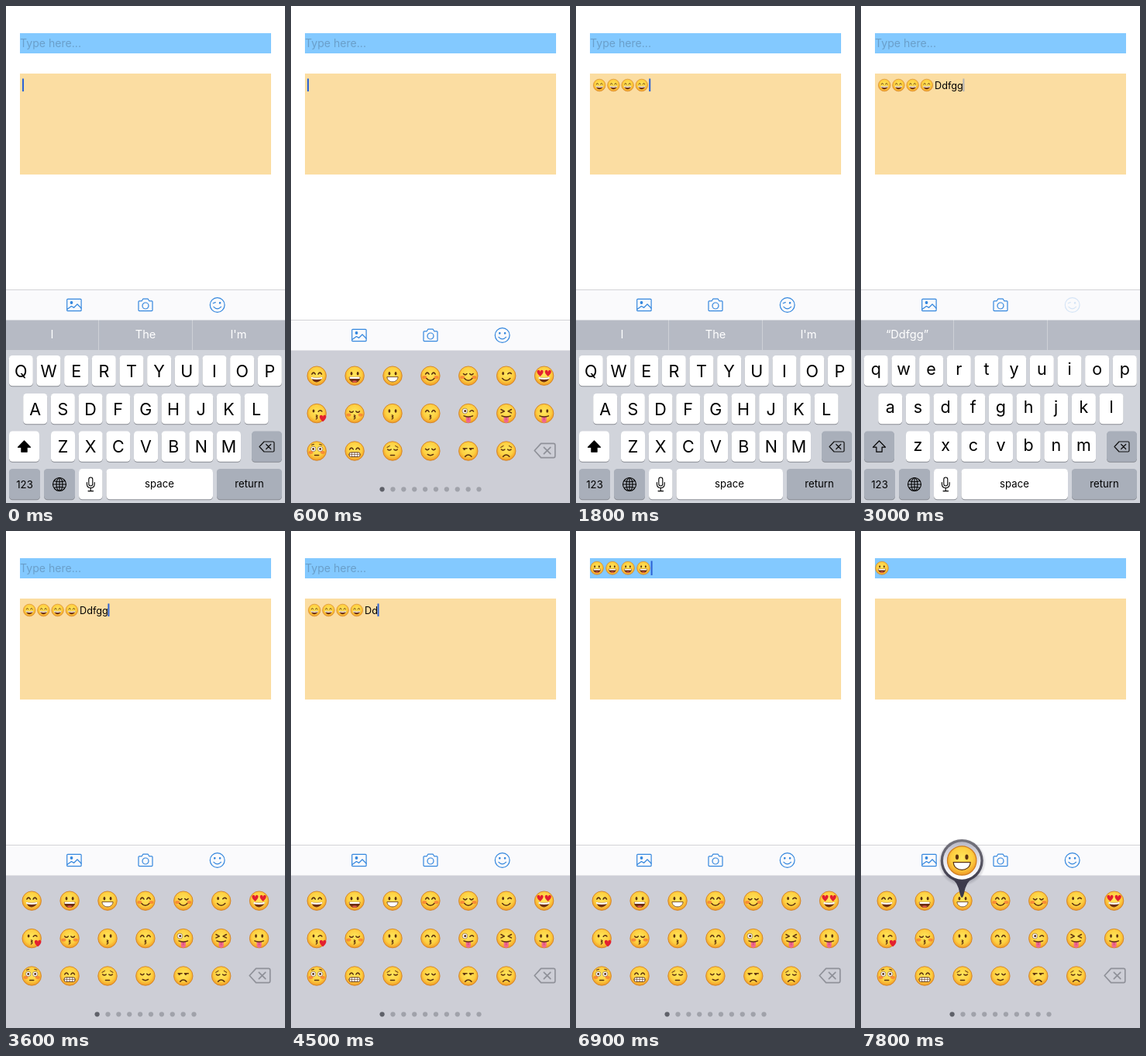
An HTML page that plays this animation: 360x640 px, repeating every 8 s.

```html
<!DOCTYPE html>
<html lang="en">
<head>
<meta charset="utf-8">
<title>Emoji keyboard</title>
<style>
  html, body { margin: 0; width: 100%; height: 100%; overflow: hidden; background: #fff; }
  svg { display: block; width: 100vw; height: 100vh; }
  text { font-family: Inter, Roboto, sans-serif; }
  .mid { text-anchor: middle; }
  .cap { font-size: 21.5px; }
  .low { font-size: 21.5px; }
  .word { font-size: 13.2px; }
  .hint { font-size: 14.6px; fill: #fff; }
  .icon { fill: none; stroke: #3487de; stroke-width: 1.2; stroke-linejoin: round; stroke-linecap: round; }
</style>
</head>
<body>
<svg id="stage" viewBox="0 0 360 640" xmlns="http://www.w3.org/2000/svg"></svg>
<script>
const LOOP = 8000, STEP = 300;
const BROWN = "#5d3210";

// keyboard (A caps, a lower, e emoji), smileys, word, field smileys, icon alpha, popup key, caret alpha
const steps = [
  ["A", 0, ""],
  ["A", 0, "", null, 0.2],
  ["e", 0, ""],
  ["e", 1, "", null, 1, 0],
  ["e", 3, ""],
  ["e", 4, "", null, 0.2],
  ["A", 4, ""],
  ["a", 4, "D"],
  ["a", 4, "Dd"],
  ["a", 4, "Ddfg"],
  ["a", 4, "Ddfgg", null, 0.18, -1, 0.35],
  ["e", 4, "Ddfgg"],
  ["e", 4, "Ddfgg"],
  ["e", 4, "Ddfg"],
  ["e", 4, "Ddf"],
  ["e", 4, "Dd"],
  ["e", 4, ""],
  ["e", 3, ""],
  ["e", 1, ""],
  ["e", 0, ""],
  ["e", 0, "", 0],
  ["e", 0, "", 1, 1, 1],
  ["e", 0, "", 3],
  ["e", 0, "", 4],
  ["e", 0, "", 3],
  ["e", 0, "", 2],
  ["e", 0, "", 1, 1, 2, 0]
];

const line = (d, w = 1.5, c = BROWN) =>
  `<path d="${d}" fill="none" stroke="${c}" stroke-width="${w}" stroke-linecap="round" stroke-linejoin="round"/>`;
const shape = (d, c, more = "") => `<path d="${d}" fill="${c}" ${more}/>`;
const oval = (x, y, rx, ry, c, more = "") =>
  `<ellipse cx="${x}" cy="${y}" rx="${rx}" ry="${ry}" fill="${c}" ${more}/>`;
const rect = (x, y, w, h, c, r = 0, more = "") =>
  `<rect x="${x}" y="${y}" width="${w}" height="${h}" rx="${r}" fill="${c}" ${more}/>`;
const label = (x, y, s, cls, more = "") => `<text x="${x}" y="${y}" class="${cls}" ${more}>${s}</text>`;
const heart = (x, y, s, c = "#e3202f") =>
  `<path transform="translate(${x} ${y}) scale(${s})" fill="${c}" d="M0 4C-6-1-4-4-2-4Q-.4-4 0-2Q.4-4 2-4C4-4 6-1 0 4Z"/>`;
const pair = f => f(-4) + f(4);

const eyes = {
  dot: pair(x => oval(x, -3, 1.35, 2.2, BROWN)),
  arc: pair(x => line(`M${x - 2.2}-2q2.2-4 4.4 0`)),
  shut: pair(x => line(`M${x - 2.2}-2.6q2.2 2.6 4.4 0`)),
  wink: oval(-4, -3, 1.35, 2, BROWN) + line("M2-2.4q2.3-2.6 4.6-.2"),
  heart: pair(x => heart(x * 1.25, -3.2, 1)),
  mad: oval(-4.3, -3, 3.3, 3.3, "#fff", `stroke="${BROWN}" stroke-width=".5"`) + oval(-4, -3, 1.5, 1.5, BROWN)
    + line("M2-2.4q2.3-2.6 4.6-.2"),
  tight: line("M-6.6-5l4.3 2.3-4.3 2M6.6-5l-4.3 2.3 4.3 2"),
  wide: pair(x => oval(x * 1.1, -2.5, 3.2, 3.2, "#fff", `stroke="${BROWN}" stroke-width=".5"`)
    + oval(x * 1.1, -2.5, 1.4, 1.4, BROWN)) + line("M-6.5-7.5l3-1M6.5-7.5l-3-1", 1),
  side: pair(x => line(`M${x - 2.5}-3.2h4.8`) + oval(x - 1, -2.3, 1.3, 1.3, BROWN)),
  sad: pair(x => line(`M${x - 2.2}-2q2.2 2 4.4 0`)) + line("M-6.8-4.5l3.2-2M6.8-4.5l-3.2-2", 1)
};

const tongue = shape("M-3 4.2H3V8.5a3 3.4 0 0 1-6 0Z", "#f0688f") + line("M0 5v3", 0.7, "#c83c68");
const mouths = {
  open: shape("M-7.2 1.6Q0 3.4 7.2 1.6C7 7-3.6 13-7.2 1.6Z", "#6e2f10")
    + shape("M-7.2 1.6Q0 3.4 7.2 1.6L6.7 4Q0 5.2-6.7 4Z", "#fff"),
  laugh: shape("M-7.2 1.4H7.2C7 11-7 11-7.2 1.4Z", "#6e2f10") + rect(-6.4, 1.6, 12.8, 2.2, "#fff", 0.6)
    + oval(0, 7.3, 3, 1.1, "#e85a50"),
  teeth: shape("M-7 1.4H7C6.6 9.6-6.6 9.6-7 1.4Z", "#fff", `stroke="${BROWN}" stroke-width=".8"`),
  smile: line("M-5 3.2Q0 8.8 5 3.2"),
  soft: line("M-3.6 4.4Q0 7 3.6 4.4"),
  kiss: line("M-.8 2.2q3.2.4 0 2.3q3.2.8 0 2.6", 1.3),
  tongue: tongue + line("M-5.6 3.2Q0 5.4 5.6 3.2"),
  grin: rect(-7, 1.8, 14, 5.5, "#fff", 2.5, `stroke="${BROWN}" stroke-width=".9"`)
    + line("M-7 4.5H7M-3.5 2v5M0 2v5M3.5 2v5", 0.6),
  flat: line("M-2.5 5.3h5"),
  frown: line("M-4 7Q0 3 4 7")
};
const blush = pair(x => oval(x * 1.85, 1.8, 2.8, 2, "#f2552d", 'opacity=".55"'));

const faces = [
  ["arc", "open"], ["dot", "laugh"], ["dot", "teeth"], ["arc", "smile", blush], ["shut", "smile", blush],
  ["wink", "smile"], ["heart", "open"],
  ["wink", "kiss", heart(7.8, 6.2, 1.05)], ["shut", "kiss", blush], ["dot", "kiss"], ["arc", "kiss"],
  ["mad", "tongue"], ["tight", "tongue"], ["dot", "tongue"],
  ["wide", "flat", blush], ["arc", "grin"], ["sad", "flat"], ["shut", "soft"], ["side", "frown"], ["sad", "frown"]
];

const face = (i, x, y, d) => `<use href="#face${i}" transform="translate(${x} ${y}) scale(${d / 25})"/>`;

const defs = `<defs>
  <radialGradient id="skin" cy=".42" r=".6"><stop offset="0" stop-color="#ffe65c"/>
    <stop offset=".62" stop-color="#fdce40"/><stop offset="1" stop-color="#ee9322"/></radialGradient>
  <linearGradient id="rim" x2="0" y2="1"><stop offset="0" stop-color="#77767f"/>
    <stop offset="1" stop-color="#3c3a4b"/></linearGradient>
  <linearGradient id="glass" x2="0" y2="1"><stop offset="0" stop-color="#b9b9c6"/>
    <stop offset=".5" stop-color="#e6e6ee"/><stop offset="1" stop-color="#fff"/></linearGradient>
  <radialGradient id="shade"><stop offset=".75" stop-color="#555564" stop-opacity=".45"/>
    <stop offset="1" stop-color="#555564" stop-opacity="0"/></radialGradient>
  ${faces.map(([e, m, more = ""], i) =>
    `<g id="face${i}"><circle r="12" fill="url(#skin)" stroke="#cf7d20" stroke-width=".8"/>${eyes[e]}${mouths[m]}${more}</g>`).join("")}
</defs>`;

const key = (x, y, w, dark) =>
  rect(x, y + 1, w, 39.3, "#888b92", 4.5) + rect(x, y, w, 39.3, dark ? "#a9afba" : "#fff", 4.5);

const rows = [["QWERTYUIOP", 19.3, 450], ["ASDFGHJKL", 37.7, 499], ["ZXCVBNM", 73.5, 547.5]];
const PITCH = 35.67;

function letters(caps) {
  return rows.map(([keys, x0, y]) => [...keys].map((c, i) => {
    const x = x0 + i * PITCH;
    return key(x - 15.5, y, 31, false) + (caps
      ? label(x, y + 27.6, c, "mid cap")
      : label(x, y + 25.4, c.toLowerCase(), "mid low"));
  }).join("")).join("");
}

const eraser = (x, y, s, c) => `<g transform="translate(${x} ${y}) scale(${s})">`
  + line("M-9.5 0L-3.5-6.5H8Q9.5-6.5 9.5-5V5Q9.5 6.5 8 6.5H-3.5ZM-.8-3l6 6M5.2-3l-6 6", 1.2, c) + "</g>";

function letterBoard(caps) {
  const arrow = "M23.5 560l-8 8.2h4.4v6h7.2v-6h4.4Z";
  const globe = `<g transform="translate(69 616)" fill="none" stroke="#000" stroke-width="1.1"><circle r="8.5"/>`
    + `<ellipse rx="4" ry="8.5"/><path d="M-8.5 0h17M0-8.5v17M-7-4.6q7 2.8 14 0M-7 4.6q7-2.8 14 0"/></g>`;
  const mic = rect(106.8, 607, 5, 11, "none", 2.5, 'stroke="#000" stroke-width="1.1"')
    + line("M104.4 613.5v2q0 5 4.9 5t4.9-5v-2M109.3 620.5v4M106 624.6h6.6", 1.1, "#000");
  return rect(0, 404, 360, 236, "#d1d4db") + rect(0, 404, 360, 39, "#b6bac4")
    + rect(119, 404, 1, 39, "#ced1d7") + rect(240, 404, 1, 39, "#ced1d7")
    + letters(caps)
    + key(4, 547.5, 39, !caps) + shape(arrow, caps ? "#000" : "none", 'stroke="#000" stroke-width="1.2" stroke-linejoin="round"')
    + key(317, 547.5, 39, true) + eraser(336.5, 567.5, 1, "#111")
    + key(4, 596, 40, true) + label(24, 621, "123", "mid word")
    + key(49, 596, 40, true) + globe
    + key(94, 596, 30.5, false) + mic
    + key(129.5, 596, 137.5, false) + label(198, 619.5, "space", "mid word")
    + key(272, 596, 84, true) + label(314, 619.5, "return", "mid word");
}

const cell = i => [33.2 + (i % 7) * 48.9, 476.2 + Math.floor(i / 7) * 48.4];

function emojiBoard() {
  const dots = Array.from({ length: 10 }, (_, i) =>
    oval(117.6 + i * 13.88, 622.3, 3.1, 3.1, i ? "#a0a2aa" : "#5f6169")).join("");
  return rect(0, 443, 360, 197, "#cdced6")
    + faces.map((_, i) => face(i, ...cell(i), 25.5)).join("")
    + eraser(327.5, 572.5, 1.4, "#8f9199") + dots;
}

function toolbar(wink) {
  const eye = wink ? `<path d="M-5.4-2.2l3-1.2"/>` : oval(-3.4, -2.6, 0.7, 0.7, "#3487de");
  return rect(0, -19.5, 360, 39, "#fafafc") + rect(0, -20, 360, 1, "#d3d3d7")
    + `<g class="icon"><rect x="78.7" y="-7.7" width="18.4" height="15.4" rx="1"/>`
    + oval(84.5, -3, 1.3, 1.3, "#3487de") + `<path d="M79 5.5l5.5-4 3 2 4.5-4.5 5 5"/>`
    + `<path d="M172 -5.2h3.2l1.6-2.6h6.4l1.6 2.6h3.2q1 0 1 1v10.8q0 1-1 1h-16q-1 0-1-1v-10.8q0-1 1-1Z"/>`
    + `<circle cx="180" cy="1" r="4"/></g>`
    + `<g class="icon smile" transform="translate(272.7 0)"><circle r="9.4"/>${eye}`
    + oval(3.4, -2.6, 0.7, 0.7, "#3487de") + `<path d="M-4.8 2.4Q0 7.4 4.8 2.4"/></g>`;
}

const group = (id, body, more = "") => `<g id="${id}" ${more}>${body}</g>`;
const stage = document.getElementById("stage");
stage.innerHTML = defs + rect(0, 0, 360, 640, "#fff")
  + rect(18, 35, 324, 26, "#83c9ff") + rect(18, 87, 324, 130, "#fbdda2")
  + label(18, 53, "Type here...", "", 'id="prompt" font-size="14.1" fill="#6a9fca"')
  + group("inputs", "")
  + label(95, 107, "", "", 'id="typed" font-size="12.7"')
  + rect(0, 0, 2, 17, "#2c62d6", 0, 'id="caret"')
  + group("caps", letterBoard(true)) + group("lower", letterBoard(false)) + group("emoji", emojiBoard())
  + group("hints", ["", "", ""].map((s, i) => label([59.5, 180, 300][i], 427.5, s, "mid hint")).join(""))
  + group("barKeys", toolbar(true), 'transform="translate(0 385)"')
  + group("barEmoji", toolbar(false), 'transform="translate(0 424)"')
  + group("popup", "");

const $ = id => document.getElementById(id);
const show = (id, on) => $(id).style.display = on ? "" : "none";
const repeat = (n, f) => Array.from({ length: n }, (_, i) => f(i)).join("");

function balloon(i) {
  const [x, y] = cell(i), top = y - 51.7;
  return `<g transform="translate(${x - 0.8} ${top})">`
    + oval(0, 2, 31, 31, "url(#shade)")
    + shape("M-17 19Q-5 27-2.5 43Q0 52 2.5 43Q5 27 17 19Z", "#3c3a4b")
    + oval(0, 0, 27.5, 27.5, "url(#rim)") + oval(0, 0, 24.2, 24.2, "url(#glass)")
    + face(i, 0, 0, 39) + "</g>";
}

function render([kb, count, word, field = null, alpha = 1, pop = -1, caret = 1]) {
  const inField = field !== null;
  show("caps", kb === "A");
  show("lower", kb === "a");
  show("emoji", kb === "e");
  show("hints", kb !== "e");
  show("barKeys", kb !== "e");
  show("barEmoji", kb === "e");
  show("prompt", !field);

  $("inputs").innerHTML = repeat(count, i => face(0, 30.2 + i * 18.2, 102, 16.3))
    + repeat(field || 0, i => face(1, 27 + i * 20, 47.8, 17.6));
  $("typed").textContent = word;
  const hints = word ? [`\u201c${word}\u201d`, "", ""] : ["I", "The", "I'm"];
  [...$("hints").children].forEach((el, i) => el.textContent = hints[i]);

  const end = word ? 94.6 + $("typed").getComputedTextLength() : 21 + count * 18.3;
  $("caret").setAttribute("x", inField ? 18 + field * 19.8 - (field ? 0.6 : 0) : end);
  $("caret").setAttribute("y", inField ? 38.5 : 93.5);
  $("caret").setAttribute("height", inField ? 18.5 : 16.5);
  $("caret").style.opacity = caret;

  stage.querySelectorAll(".smile").forEach(el => el.style.opacity = alpha);
  $("popup").innerHTML = pop < 0 ? "" : balloon(pop);
}

let last = -1;
function tick() {
  const i = Math.min(steps.length - 1, Math.floor(performance.now() % LOOP / STEP));
  if (i !== last) render(steps[last = i]);
  requestAnimationFrame(tick);
}
tick();
</script>
</body>
</html>
```
